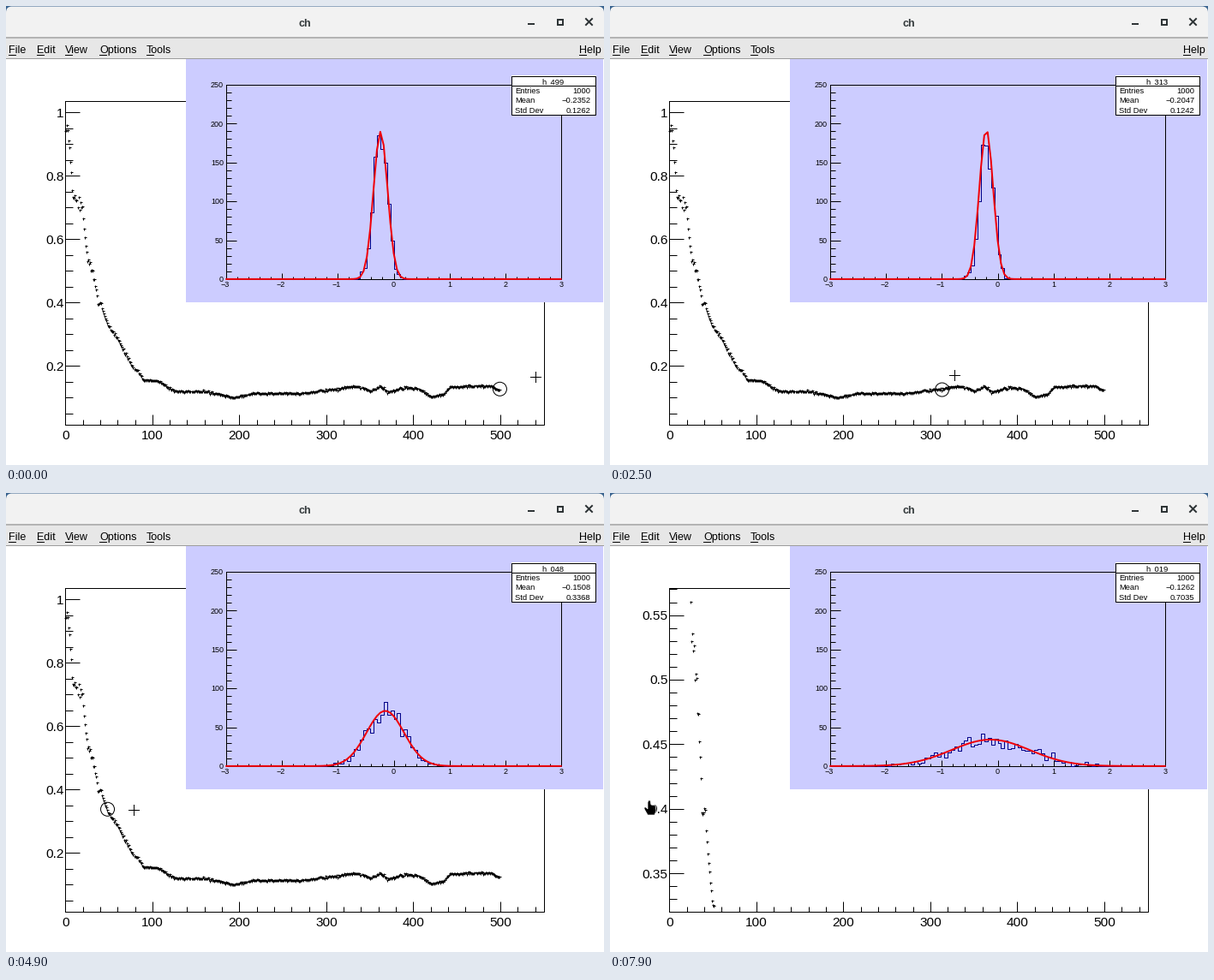
A matplotlib script that plays this animation: 698 by 536 pixels, repeating every 8 s.

```python
import numpy as np
import matplotlib.pyplot as plt
from matplotlib.animation import FuncAnimation
from matplotlib.patches import Circle, FancyBboxPatch, Polygon, Rectangle

W, H, DPI = 698, 536, 64
PX = 72 / DPI  # points per pixel
STEP, FRAMES = 100, 80

plt.rcParams["font.family"] = "Liberation Sans"
fig = plt.figure(figsize=(W / DPI, H / DPI), dpi=DPI)
ax = fig.add_axes([0, 0, 1, 1])
ax.set(xlim=(0, W), ylim=(H - 1, -1))
ax.axis("off")


# ---------- drawing helpers (pixel coordinates, y down) ----------
def fill(x0, y0, x1, y1, color, z=1):
    ax.add_patch(Rectangle((x0, y0 - 1), x1 - x0, y1 - y0, fc=color, lw=0, zorder=z))


def line(xs, ys, color="black", width=1.0, z=3, **kw):
    return ax.plot(xs, ys, color=color, lw=width * PX, zorder=z, **kw)[0]


def frame(x0, y0, x1, y1, z=3):
    return line([x0, x1, x1, x0, x0], [y0, y0, y1, y1, y0], z=z, solid_joinstyle="miter")


def label(x, yc, s, size, ha="left", z=4, **kw):
    return ax.text(x, yc + 0.36 * size, s, fontsize=size * PX, ha=ha,
                   va="baseline", zorder=z, **kw)


def scale(lo, hi, p0, p1):
    return lambda v: p0 + (v - lo) * (p1 - p0) / (hi - lo)


def steps(lo, hi, d):
    return np.arange(np.ceil(lo / d - 1e-6), np.floor(hi / d + 1e-6) + 1) * d


def ticks(to_px, base, lo, hi, major, minor, length, z, vertical=False):
    along, out = [], []
    for d, size in ((minor, length / 2), (major, length)):
        for v in steps(lo, hi, d):
            along += [to_px(v), to_px(v), np.nan]
            out += [base, base + size if vertical else base - size, np.nan]
    xs, ys = (out, along) if vertical else (along, out)
    return line(xs, ys, z=z, solid_capstyle="butt")


def signed(v, fmt="{:.4f}"):
    return fmt.format(v).replace("-", "\u2212")


# ---------- window chrome ----------
def draw_window():
    fill(0, 0, W, 40, "#39638f", 0)
    ax.add_patch(FancyBboxPatch((7, 6.5), W - 14, 60, boxstyle="round,pad=7",
                                fc="#f2f2f2", lw=0, zorder=0.5))
    fill(0, 36, W, 38, "#b4b4b4")
    fill(0, 38, W, 61, "#e7e7e7")
    fill(0, 61, W, 62, "#9c9c9c")
    fill(0, 62, W, H, "white")
    label(348.5, 18, "ch", 12.5, "center", weight="bold", color="#33393b")
    fill(609, 20, 617, 22, "#2e3436", 3)
    line([644, 650, 650, 644, 644], [15, 15, 21, 21, 15], "#2e3436", 2,
         solid_joinstyle="miter")
    for ys in ([14, 21], [21, 14]):
        line([677, 684], ys, "#2e3436", 2)
    for x, name in ((3, "File"), (36, "Edit"), (69, "View"), (109, "Options"),
                    (164, "Tools"), (669, "Help")):
        label(x, 49.5, name, 12.5)
        line([x, x + 8], [56, 56])


# ---------- data ----------
# selected point: (mean, standard deviation)
READINGS = {19: (-0.1262, 0.7035), 22: (-0.1599, 0.6071), 48: (-0.1508, 0.3368),
            158: (-0.1662, 0.1262), 313: (-0.2047, 0.1242), 385: (-0.2212, 0.1334),
            499: (-0.2352, 0.1262)}
# turning points of the width curve
KNOTS = [(0, .95), (4, .93), (9, .73), (19, .70), (24, .55), (31, .50), (37, .402),
         (41, .395), (48, .335), (60, .286), (75, .21), (90, .158), (108, .152),
         (125, .121), (160, .121), (195, .101), (215, .115), (270, .114), (335, .138),
         (350, .121), (362, .138), (370, .119), (390, .134), (405, .130), (420, .104),
         (434, .111), (442, .137), (490, .138), (499, .122)]
BINS, BIN_W, ENTRIES = 100, 0.06, 1000

index = np.arange(500)
sigma = np.interp(index, *zip(*KNOTS)) * (1 + np.random.default_rng(4).normal(0, 0.013, 500))
for i, (_, std) in READINGS.items():
    sigma[i] = std
means = np.interp(index, list(READINGS), [m for m, _ in READINGS.values()])
edges = np.linspace(-3, 3, BINS + 1)


def gauss(x, mean, std):
    return ENTRIES * BIN_W * np.exp(-((x - mean) / std) ** 2 / 2) / (std * np.sqrt(2 * np.pi))


def counts(i):
    mid = edges[:-1] + BIN_W / 2
    return np.random.default_rng(i).poisson(gauss(mid, means[i], sigma[i]))


# ---------- main graph ----------
LEFT, TOP, RIGHT, BOTTOM = 69, 110, 628, 488
Y_LO, Y_HI = 0.0144, 1.036
DRAG_FROM, DRAG_TO = 282, 375
gx = scale(0, 550, 69.3, 627.7)
gy = scale(Y_LO, Y_HI, 488.2, 109.8)
value_at = scale(488.2, 109.8, Y_LO, Y_HI)


def graph(lo, hi, major, minor):
    to_px = scale(lo, hi, 488.2, 109.8)
    parts = [ticks(to_px, LEFT, lo, hi, major, minor, 17, 3, vertical=True)]
    for v in steps(lo, hi, major):
        parts.append(label(67.5, to_px(v), f"{v:.3g}", 15.4, "right"))
    keep = (sigma > lo) & (sigma < hi)
    parts += ax.plot(gx(index[keep]), to_px(sigma[keep]), "+", color="black",
                     ms=3 * PX, mew=PX, zorder=3)
    return parts


draw_window()
frame(LEFT, TOP, RIGHT, BOTTOM)
ticks(gx, BOTTOM, 0, 550, 100, 20, 12, 3)
for v in range(0, 501, 100):
    label(gx(v), 499, str(v), 15.4, "center")
full = graph(Y_LO, Y_HI, 0.2, 0.05)
zoomed = graph(value_at(DRAG_TO), value_at(DRAG_FROM), 0.05, 0.01)
ring = ax.add_patch(Circle((0, 0), 8, fill=False, ec="black", lw=PX, zorder=4))

# ---------- inset histogram ----------
hx = scale(-3, 3, 257.3, 647.7)
hy = scale(0, 250, 317.9, 90.9)

fill(210, 62, 697, 346, "#ccccff", 5)
frame(257, 91, 648, 318, 6)
ticks(hx, 318, -3, 3, 1, 0.2, 7, 6)
ticks(hy, 257, 0, 250, 50, 10, 12, 6, vertical=True)
for v in range(-3, 4):
    label(hx(v) - (1.5 if v < 0 else 0), 324, signed(v, "{}"), 9, "center", 6)
for v in range(0, 251, 50):
    label(254, hy(v), str(v), 9, "right", 6)
hist = line([], [], "#000088", z=7, drawstyle="steps-post")
fit = line([], [], "#f00008", 2, z=8)

fill(590, 81, 689, 127, "white", 9)
frame(590, 81, 688, 126, 10)
line([590, 688], [92, 92], z=10)
title = label(638, 87, "", 9.4, "center", 10)
for y, name in ((98, "Entries"), (109, "Mean"), (121, "Std Dev")):
    label(594, y, name, 9.4, z=10)
label(682.5, 98, str(ENTRIES), 9.4, "right", 10)
mean_text = label(682.5, 109, "", 9.4, "right", 10)
std_text = label(682.5, 121, "", 9.4, "right", 10)

# ---------- pointer ----------
cross = line([], [], z=12)
HAND = np.array([(-1, 0), (1, 0), (2, 5), (7, 6), (8, 12), (6, 17), (-2, 17),
                 (-6, 10), (-6, 8), (-4, 8), (-2, 10), (-2, 2)])
hand = ax.add_patch(Polygon(HAND, fc="black", ec="white", lw=0.7 * PX, zorder=12))
rubber = frame(LEFT, DRAG_FROM, RIGHT - 1, DRAG_FROM, 11)

# time, pointer x, pointer y, selected point
KEYS = np.array([(300, 618, 432, 499), (1700, 473, 431, 385), (1800, 473, 431, 385),
                 (2500, 402, 430, 313), (3700, 258, 428, 158), (4500, 165, 412, 66),
                 (4900, 149, 369, 48), (5600, 134, 287, 22), (6000, 47, 248, 19),
                 (6100, 47, 248, 19), (6500, 48, DRAG_FROM, 19), (7500, 52, DRAG_TO, 19),
                 (7800, 52, DRAG_TO, 19), (7900, 46, 358, 19)])
PRESS, RELEASE = 6500, 7600


def update(n):
    t = n * STEP
    x, y, i = (int(round(np.interp(t, KEYS[:, 0], col))) for col in KEYS.T[1:])
    zoom = t >= RELEASE

    for part in full:
        part.set_visible(not zoom)
    for part in zoomed:
        part.set_visible(zoom)
    ring.set_visible(not zoom)
    ring.center = (gx(i) + 0.5, gy(sigma[i]) - 0.5)

    c = counts(i)
    hist.set_data(hx(edges), hy(np.append(c, c[-1])))
    fit.set_data(hx(edges), hy(gauss(edges, means[i], sigma[i])))
    title.set_text(f"h_{i:03d}")
    mean_text.set_text(signed(means[i]))
    std_text.set_text(f"{sigma[i]:.4f}")

    on_axis = x < LEFT
    cross.set_visible(not on_axis)
    cross.set_data([x - 6, x + 6, np.nan, x, x], [y, y, np.nan, y - 6, y + 6])
    hand.set_visible(on_axis)
    hand.set_xy(HAND + (x, y))
    rubber.set_visible(PRESS < t < RELEASE)
    rubber.set_ydata([DRAG_FROM, DRAG_FROM, y, y, DRAG_FROM])
    return []


anim = FuncAnimation(fig, update, frames=FRAMES, interval=STEP, init_func=lambda: [],
                     repeat=True, repeat_delay=0, blit=False)
plt.show()
```
